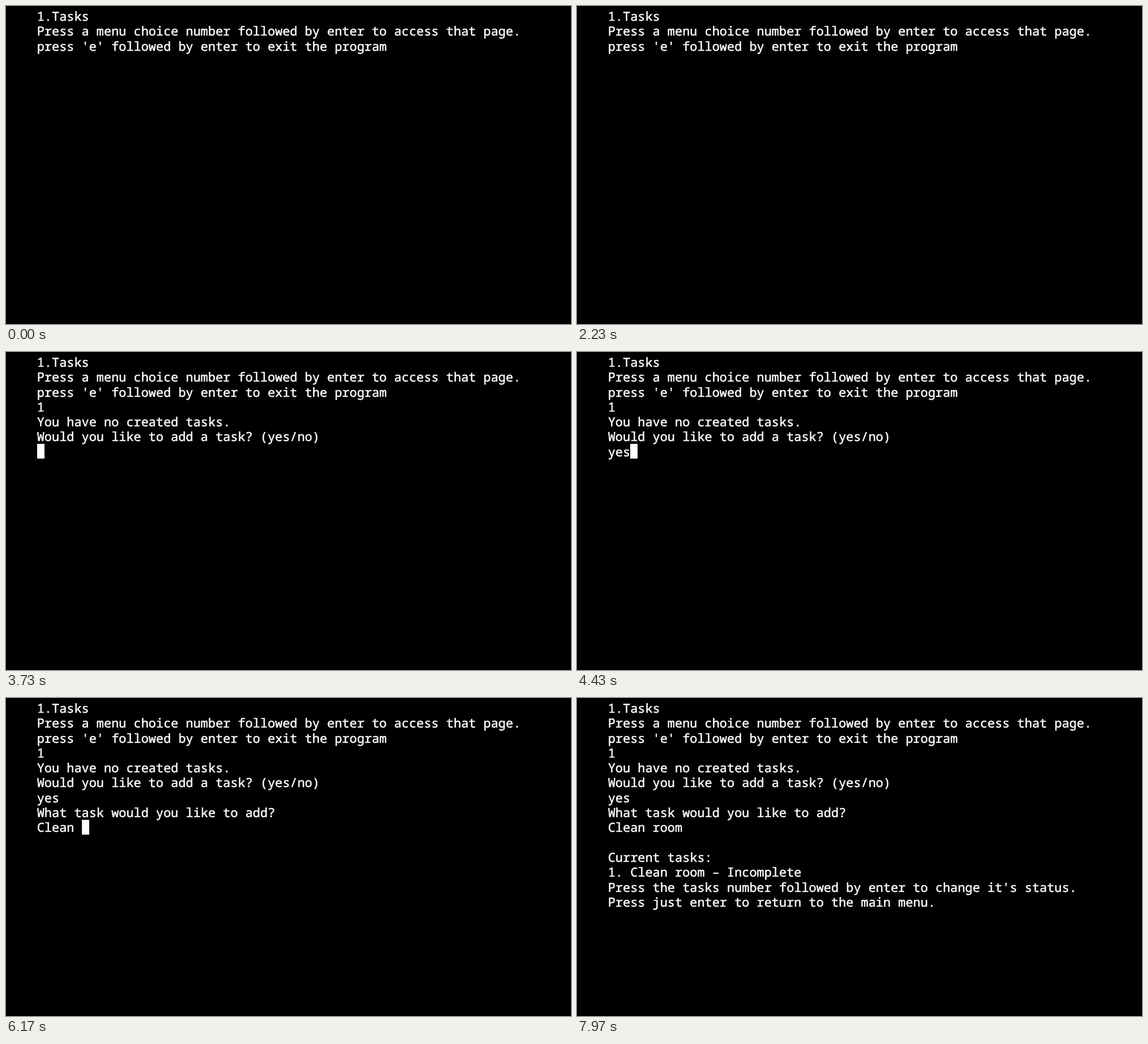
Animation, 998 px wide and 561 px high, one loop 8000 ms. Source, as an HTML page with a canvas:

```html
<!DOCTYPE html>
<html lang="en">
<head>
<meta charset="utf-8">
<title>Task list terminal</title>
<style>
  html, body { margin: 0; width: 100%; height: 100%; overflow: hidden; background: #000; }
  canvas { display: block; }
</style>
</head>
<body>
<canvas id="stage" width="998" height="561"></canvas>
<script>
const ctx = document.getElementById('stage').getContext('2d');

const LOOP = 8000;
const BLINK = 530;
const LEFT = 54.7, TOP = 4.3;
const CELL_W = 13.152, CELL_H = 26.3;
const BASELINE = 21.6;

const MENU = `1.Tasks
Press a menu choice number followed by enter to access that page.
press 'e' followed by enter to exit the program
`;
const ASK_ADD = `
You have no created tasks.
Would you like to add a task? (yes/no)
`;
const ASK_NAME = `
What task would you like to add?
`;
const TASK_LIST = `

Current tasks:
1. Clean room – Incomplete
Press the tasks number followed by enter to change it's status.
Press just enter to return to the main menu.
`;

// Terminal log: [time, text added]; the first entry sets the cursor phase.
const log = [[-610, MENU]];

function type(word, start, step) {
  [...word].forEach((ch, i) => log.push([start + i * step, ch]));
}

type('1', 2850, 0);
log.push([3240, ASK_ADD]);
type('yes', 3950, 140);
log.push([4500, ASK_NAME]);
type('Clean ', 5610, 105);
type('room', 6320, 120);
log.push([7150, TASK_LIST]);

function drawLine(line, row) {
  const y = TOP + row * CELL_H + BASELINE;
  ctx.fillText(line, LEFT, y);
  ctx.strokeText(line, LEFT, y);
}

function draw(t) {
  const shown = log.filter(([time]) => time <= t);
  const lines = shown.map(([, text]) => text).join('').split('\n');
  const lastInput = shown[shown.length - 1][0];

  ctx.fillStyle = '#000';
  ctx.fillRect(0, 0, 998, 561);

  // A thin outline gives the text its slightly heavier weight.
  ctx.font = '21.92px "Noto Sans Mono", "DejaVu Sans Mono", monospace';
  ctx.textRendering = 'geometricPrecision';
  ctx.fillStyle = ctx.strokeStyle = '#fcfcf8';
  ctx.lineWidth = 0.55;
  ctx.lineJoin = 'round';
  lines.forEach(drawLine);

  // Each key press restarts the blink with the cursor visible.
  if (Math.floor((t - lastInput) / BLINK) % 2 === 0) {
    const row = lines.length - 1;
    const x = Math.round(LEFT + lines[row].length * CELL_W);
    const y = Math.round(TOP + row * CELL_H);
    ctx.fillStyle = '#fff';
    ctx.fillRect(x, y, 13, 26);
  }
}

const start = performance.now();

function frame() {
  draw((performance.now() - start) % LOOP);
  requestAnimationFrame(frame);
}
frame();
</script>
</body>
</html>
```
